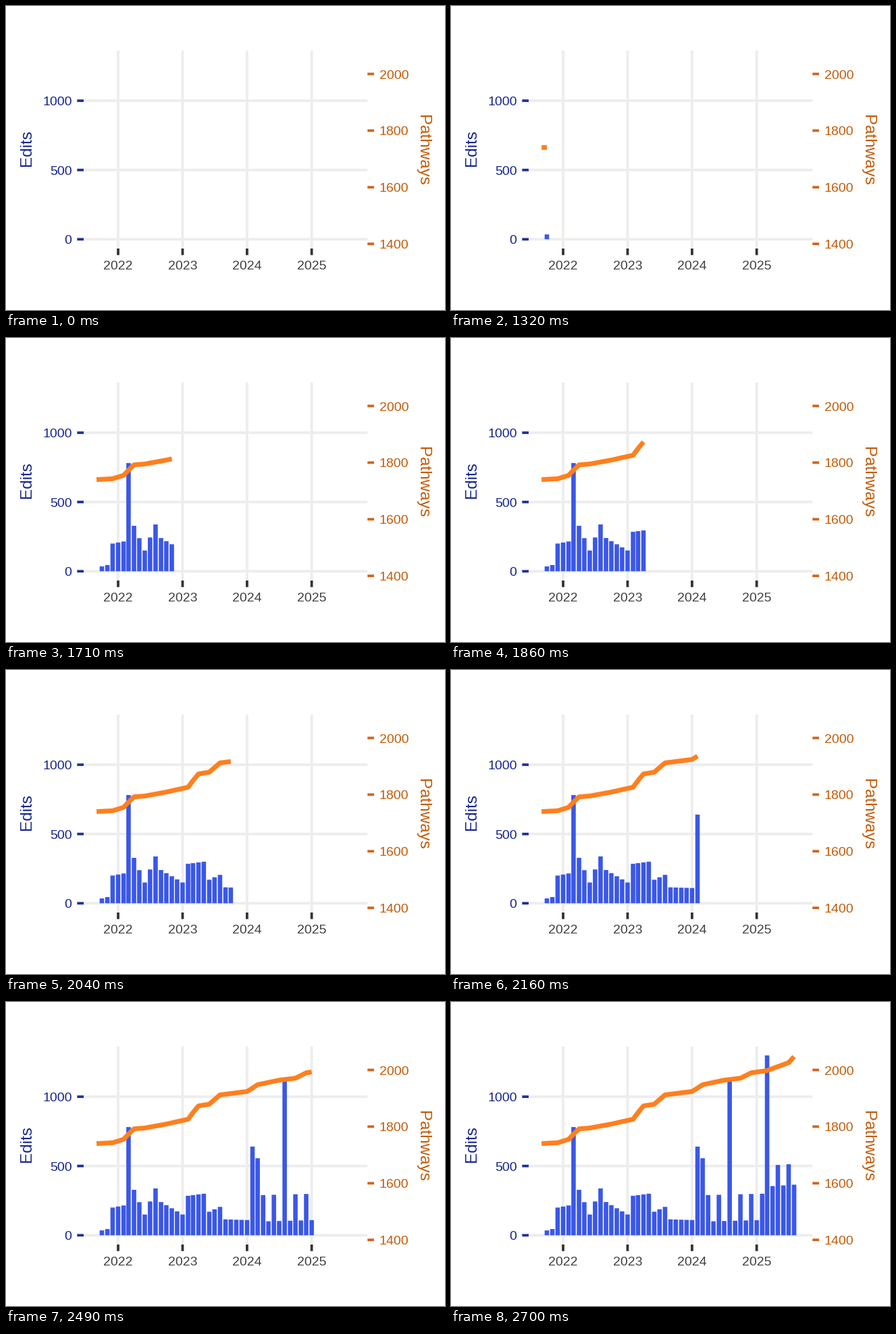
Write a matplotlib script that moves like this. It is 650x450 px and loops after 2730 ms.

```python
import numpy as np
import matplotlib.pyplot as plt
from matplotlib.animation import FuncAnimation
from matplotlib.patches import Rectangle

W, H, DPI = 650, 450, 100
PX = 72 / DPI  # points per pixel
HOLD, STEPS, INTERVAL = 44, 47, 30

LEFT, RIGHT, TOP, BOTTOM = 115, 535.25, 66, 359
TICK = 9.7
BAR, LINE = "#3a57e8", "#ff7f1e"
BLUE, ORANGE, DARK, GRID = "#1f3099", "#d2651a", "#333333", "#ededed"
BLUE_TEXT, ORANGE_TEXT, GREY_TEXT = "#17268f", "#c25c0a", "#424242"

DAY = (RIGHT - LEFT) / 1.1 / 1461  # pixels per day
BAR_W = 0.9 * 28 * DAY
START = np.datetime64("2021-09-01")

# Month number: value at the turning points
TREND = {0: 35, 1: 45, 2: 200, 4: 215, 6: 328, 8: 150, 10: 338, 11: 240,
         15: 150, 16: 285, 19: 300, 20: 170, 22: 205, 23: 115, 27: 110,
         30: 195, 40: 205, 42: 430, 46: 440}
SPIKES = {5: 781, 28: 640, 29: 556, 34: 1112, 41: 1298}
GROWTH = {0: 1740, 3: 1743, 5: 1755, 7: 1792, 9: 1795, 13: 1809, 17: 1826,
          19: 1873, 21: 1879, 23: 1912, 28: 1924, 30: 1948, 34: 1964,
          37: 1971, 39: 1990, 42: 1998, 46: 2026, 47: 2047}


def between(points, n):
    return np.interp(np.arange(n), list(points), list(points.values()))


def monthly_edits():
    """Trend with a late month-to-month swing and a few spikes."""
    swing = between({29: 0, 30: 95, 40: 95, 42: -75}, STEPS)
    edits = between(TREND, STEPS) + swing * (-1.0) ** np.arange(STEPS)
    edits[list(SPIKES)] = list(SPIKES.values())
    return edits


def date_x(month):
    days = (np.datetime64(month, "D") - START).astype(int)
    return LEFT + (RIGHT - LEFT) * 0.05 / 1.1 + days * DAY


def edit_y(v):
    return 345.3 - 0.2051 * v


def path_y(v):
    return 100.6 + 0.4192 * (2000 - v)


plt.rcParams["font.family"] = "Liberation Sans"
fig = plt.figure(figsize=(W / DPI, H / DPI), dpi=DPI, facecolor="white")
ax = fig.add_axes([0, 0, 1, 1])
ax.set_xlim(0, W)
ax.set_ylim(H, 0)
ax.axis("off")


def segment(xs, ys, color):
    ax.plot(xs, ys, color=color, lw=3.8 * PX, solid_capstyle="butt",
            snap=False, zorder=1)


def label(x, y, text, color, size=19.5, ha="center", rotation=0):
    ax.text(x, y, text, color=color, fontsize=size * PX, ha=ha,
            va="baseline", rotation=rotation, rotation_mode="anchor")


for v in (0, 500, 1000):
    y = edit_y(v)
    segment([LEFT, RIGHT], [y, y], GRID)
    segment([LEFT - TICK, LEFT], [y, y], BLUE)
    label(97.5, y + 7, str(v), BLUE_TEXT, ha="right")

for year in range(2022, 2026):
    x = date_x(f"{year}-01")
    segment([x, x], [TOP, BOTTOM], GRID)
    segment([x, x], [BOTTOM, BOTTOM + TICK], DARK)
    label(x, 390, str(year), GREY_TEXT)

for v in range(1400, 2001, 200):
    y = path_y(v)
    segment([RIGHT, RIGHT + TICK], [y, y], ORANGE)
    label(552.5, y + 7, str(v), ORANGE_TEXT, ha="left")

label(37, 210.5, "Edits", BLUE_TEXT, size=24.2, rotation=90)
label(610.5, 213.5, "Pathways", ORANGE_TEXT, size=24.2, rotation=-90)

months = np.arange("2021-09", "2025-09", dtype="datetime64[M]")
xs = np.array([date_x(m) for m in months])
ys = path_y(between(GROWTH, len(months)))

bars = [
    ax.add_patch(Rectangle((x - BAR_W / 2, edit_y(v)), BAR_W, edit_y(0) - edit_y(v),
                           color=BAR, lw=0, snap=False, zorder=2, visible=False))
    for x, v in zip(xs[1:], monthly_edits())
]
curve, = ax.plot([], [], color=LINE, lw=7 * PX, snap=False, zorder=3,
                 solid_capstyle="butt", solid_joinstyle="round")


def draw(i):
    shown = max(0, i - HOLD + 1)
    for k, bar in enumerate(bars):
        bar.set_visible(k < shown)
    end = shown + 1 if shown else 0
    curve.set_data(xs[:end], ys[:end])
    return [*bars, curve]


anim = FuncAnimation(fig, draw, frames=HOLD + STEPS, interval=INTERVAL,
                     repeat=True, repeat_delay=0, blit=False)
plt.show()
```
